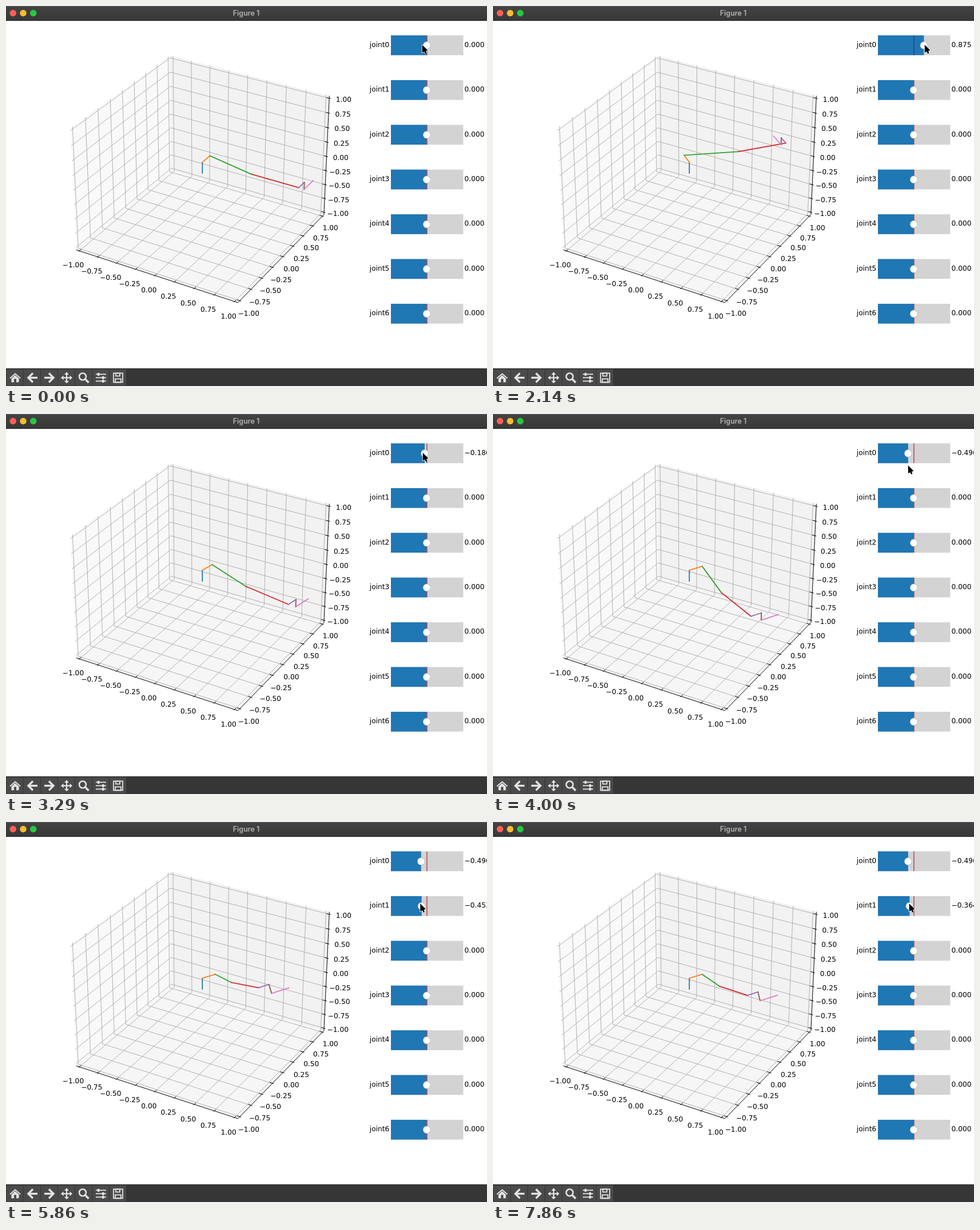
An HTML page with a canvas that plays this animation: 841x666 px, repeating every 8 s.

```html
<!DOCTYPE html>
<html lang="en">
<head>
<meta charset="utf-8">
<title>Joint sliders</title>
<style>
html, body { margin: 0; width: 100%; height: 100%; overflow: hidden; background: #fff; }
canvas { display: block; }
</style>
</head>
<body>
<canvas id="stage" width="841" height="666"></canvas>
<script>
const ctx = document.getElementById('stage').getContext('2d');
const LOOP = 8000, STEP = 1000 / 7;
const EDGE = 1 + 1 / 24;
const INK = '#e4e4e4';

// Turning points of the pointer's swing: [step, slider value]
const SWING = [[0, -.4], [7, -.893], [15, .945], [25.1, -.496], [29, -.496], [36, .66], [41, -.57], [48, .3], [55, -.399]];
const RELEASE = 25.1, GRAB = 33;

const ease = u => (1 - Math.cos(Math.PI * Math.min(1, Math.max(0, u)))) / 2;

function swing(step) {
  const i = Math.max(1, SWING.findIndex(key => key[0] >= step));
  const [t0, a] = SWING[i - 1], [t1, b] = SWING[i];
  return a + (b - a) * ease((step - t0) / (t1 - t0));
}

// Perspective view: elevation 30°, azimuth -60°, box 4:4:3
function project([x, y, z]) {
  const k = 1 - .02474 * x + .04286 * y - .02143 * z;
  return [343.3 + (134.7 * x + 77.8 * y) / k, 292.9 + (38.9 * x - 67.4 * y - 101.1 * z) / k];
}

function path(points) {
  ctx.beginPath();
  points.forEach(p => ctx.lineTo(...p));
}
function line(points, color, width) {
  path(points);
  ctx.strokeStyle = color;
  ctx.lineWidth = width;
  ctx.stroke();
}
function fill(points, color) {
  path(points);
  ctx.fillStyle = color;
  ctx.fill();
}
function rect(x, y, w, h, color) {
  ctx.fillStyle = color;
  ctx.fillRect(x, y, w, h);
}
function circle(x, y, r, color) {
  ctx.beginPath();
  ctx.arc(x, y, r, 0, 2 * Math.PI);
  ctx.fillStyle = color;
  ctx.fill();
}
function text(str, x, y, align) {
  ctx.font = '12.2px "DejaVu Sans", sans-serif';
  ctx.textAlign = align;
  ctx.fillStyle = '#000';
  ctx.fillText(str, x, y + 4.4);
}
const format = (v, digits) => v.toFixed(digits).replace('-', '\u2212');

function drawAxes() {
  const e = EDGE, inner = e - .035, outer = e + .017;
  const wire = (points, color) => line(points.map(project), color, 1);
  const pane = (at, color) => fill([at(-e, -e), at(e, -e), at(e, e), at(-e, e)].map(project), color);
  pane((a, b) => [-e, a, b], '#f9f9f9');
  pane((a, b) => [a, e, b], '#f2f2f2');
  pane((a, b) => [a, b, -e], '#f6f6f6');
  for (let v = -1; v <= 1; v += .25) {
    wire([[v, -e, -e], [v, e, -e], [v, e, e]], '#b0b0b0');
    wire([[e, v, -e], [-e, v, -e], [-e, v, e]], '#b0b0b0');
    wire([[-e, -e, v], [-e, e, v], [e, e, v]], '#b0b0b0');
  }
  wire([[-e, -e, -e], [e, -e, -e], [e, e, -e], [e, e, e]], '#000');
  for (let v = -1; v <= 1; v += .25) {
    wire([[v, -inner, -e], [v, -outer, -e]], '#000');
    wire([[inner, v, -e], [outer, v, -e]], '#000');
    wire([[inner, e, v], [outer, e, v]], '#000');
    for (const p of [[v, -e - .13, -e - .15], [e + .11, v, -e - .17], [e + .15, e + .06, v]])
      text(format(v, 2), ...project(p), 'center');
  }
}

function drawArm(q0, q1) {
  const c0 = Math.cos(q0), s0 = Math.sin(q0), c1 = Math.cos(q1), s1 = Math.sin(q1);
  let tip = [0, 0, 0];
  const link = (color, x, y, z) => {
    const reach = x * c1 + z * s1, rise = z * c1 - x * s1;
    const next = [tip[0] + reach * c0 - y * s0, tip[1] + reach * s0 + y * c0, tip[2] + rise];
    line([tip, next].map(project), color, 1.8);
    tip = next;
  };
  ctx.lineCap = 'square';
  line([tip, [0, 0, .188]].map(project), '#1f77b4', 1.8);
  tip = [0, 0, .188];
  link('#ff7f0e', 0, .17, 0);
  link('#2ca02c', .607, -.132, 0);
  link('#d62728', .583, 0, 0);
  link('#9467bd', 0, .134, 0);
  link('#8c564b', 0, 0, -.122);
  link('#e377c2', 0, .223, 0);
  ctx.lineCap = 'butt';
}

const sliderX = v => 735.8 + v * 63.2 / Math.PI;

function drawSlider(i, value) {
  const mid = 69 + 78.4 * i, top = mid - 17.5, x = sliderX(value);
  rect(673, top, 126.5, 34.7, '#d3d3d3');
  rect(673, top, x - 673, 34.7, '#1f77b4');
  rect(735.3, top, 1.3, 34.7, value > .03 ? '#2b3c72' : '#a8323c');
  circle(x, mid, 6.8, '#bfbfbf');
  circle(x, mid, 5.9, '#fff');
  text('joint' + i, 670.3, mid - 1.6, 'right');
  text(format(value, 3), 801.6, mid - 1.6, 'left');
}

function drawTitleBar() {
  const shade = ctx.createLinearGradient(0, 0, 0, 25);
  shade.addColorStop(0, '#434343');
  shade.addColorStop(1, '#383838');
  rect(0, 0, 841, 25, shade);
  rect(0, 0, 841, 1, '#565656');
  rect(0, 25, 841, 1, '#1c1c1c');
  ['#ff5f57', '#febc2e', '#28c840'].forEach((color, i) => circle(12.3 + 17.7 * i, 12.5, 5.7, color));
  ctx.font = '600 12.5px Inter, sans-serif';
  ctx.textAlign = 'center';
  ctx.fillStyle = '#b4b4b4';
  ctx.fillText('Figure 1', 420, 17);
}

function box(x, y, w, h) {
  ctx.strokeStyle = INK;
  ctx.lineWidth = 1.8;
  ctx.strokeRect(x, y, w, h);
}
function home() {
  line([[-9, 1], [0, -7], [9, 1]], INK, 2);
  fill([[-7, 2], [0, -4.5], [7, 2]], INK);
  rect(-6.5, 1.5, 4.5, 6.5, INK);
  rect(2, 1.5, 4.5, 6.5, INK);
}
function back() {
  line([[1, -8], [-7, 0], [1, 8]], INK, 3.4);
  line([[-6, 0], [9, 0]], INK, 3.4);
}
function forward() {
  ctx.scale(-1, 1);
  back();
}
function move() {
  for (let i = 0; i < 4; i++) {
    line([[0, 0], [0, -8]], INK, 2.2);
    fill([[0, -10], [4, -5.5], [-4, -5.5]], INK);
    ctx.rotate(Math.PI / 2);
  }
}
function zoom() {
  line([[3, 3], [8.5, 8.5]], INK, 3.6);
  ctx.beginPath();
  ctx.arc(-2, -2, 6, 0, 2 * Math.PI);
  ctx.lineWidth = 2.6;
  ctx.stroke();
}
function adjust() {
  for (let i = -1; i <= 1; i++) {
    rect(-9, 6 * i - 1, 18, 1.8, INK);
    rect(i ? 4 * i - 2 : 2, 6 * i - 2.5, 3.5, 5, INK);
  }
}
function save() {
  box(-8, -8, 16, 16);
  box(-4, -8, 7, 5);
  box(-5, 2, 10, 6);
}

function drawToolbar() {
  rect(0, 635, 841, 31, '#363636');
  [home, back, forward, move, zoom, adjust, save].forEach((icon, i) => {
    rect(1 + 30 * i, 637, 29, 28, '#4a4a4a');
    ctx.save();
    ctx.translate(16 + 30 * i, 651.5);
    icon();
    ctx.restore();
  });
}

function drawCursor(x, y) {
  ctx.save();
  ctx.translate(x, y);
  const head = [[0, 0], [0, 13.5], [9.5, 9.5], [0, 0]], tail = [[4, 9], [6.4, 15]];
  line(head, '#f4f4f4', 1.8);
  line(tail, '#f4f4f4', 4.2);
  fill(head, '#000');
  line(tail, '#000', 2.6);
  ctx.restore();
}

function draw(ms) {
  const step = Math.floor((ms % LOOP + 3) / STEP);
  // Sliders trail the pointer by one step
  const q0 = step ? swing(Math.min(step - 1, RELEASE)) : 0;
  const q1 = step > GRAB ? swing(step - 1) : 0;
  rect(0, 0, 841, 666, '#fff');
  drawAxes();
  drawArm(q0, q1);
  for (let i = 0; i < 7; i++) drawSlider(i, [q0, q1][i] || 0);
  drawTitleBar();
  drawToolbar();
  drawCursor(sliderX(swing(step)), 68 + 75 * ease((step - RELEASE) / (GRAB - RELEASE)));
}

const start = performance.now();
function tick() {
  draw(performance.now() - start);
  requestAnimationFrame(tick);
}
tick();
</script>
</body>
</html>
```
